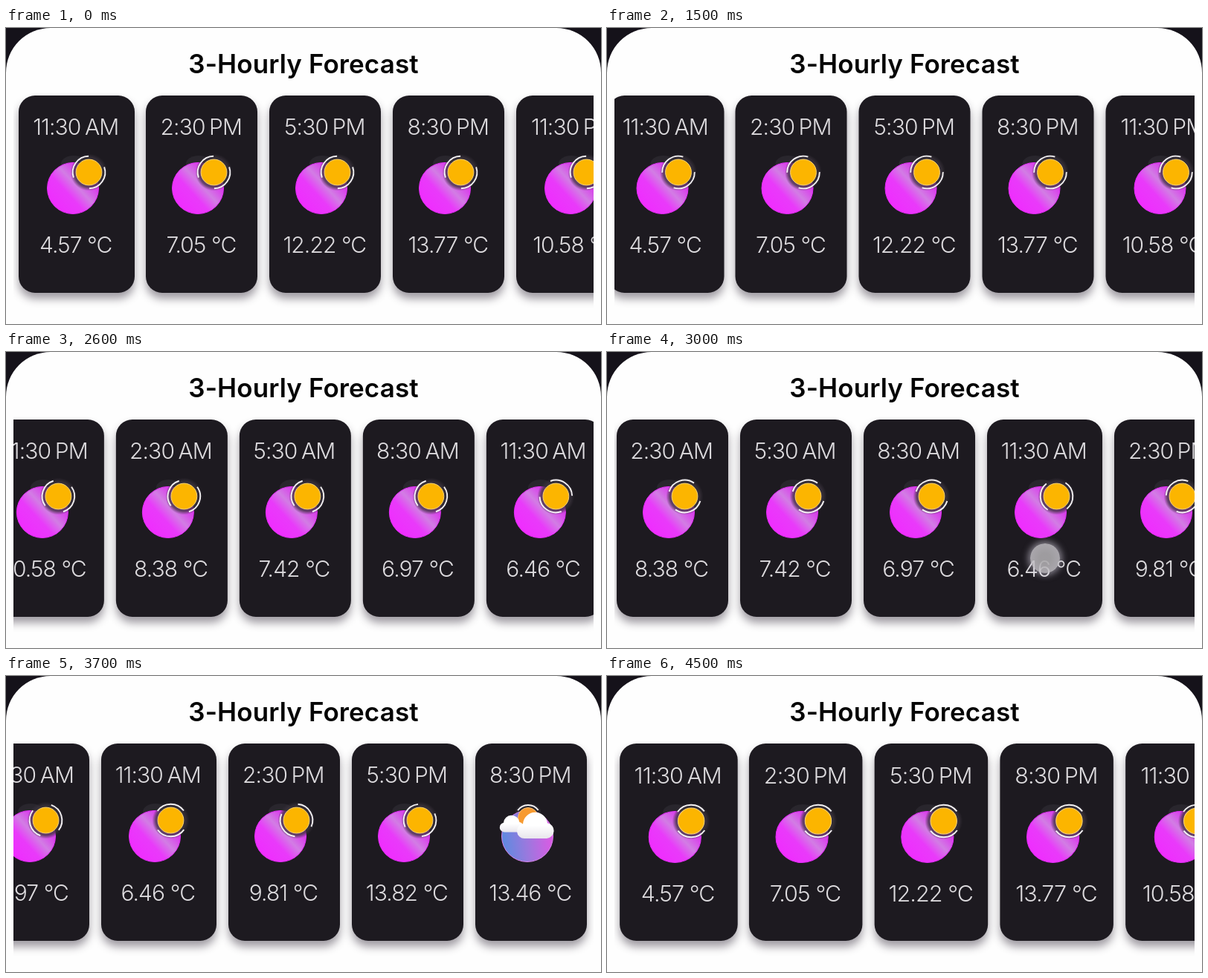
Recreate the animation shown at these times as an HTML page. Size 800 by 399 pixels, loop 4600 ms.

```html
<!DOCTYPE html>
<html lang="en">
<head>
<meta charset="utf-8">
<title>3-Hourly Forecast</title>
<style>
  html, body { margin: 0; width: 100%; height: 100%; overflow: hidden; background: #15121a; }
  body { font-family: Inter, "Liberation Sans", sans-serif; }
  #stage { position: relative; width: 800px; height: 399px; overflow: hidden; }
  #sheet { position: absolute; inset: 0; background: #fefefe; border-radius: 60px 60px 0 0; }
  h1 {
    position: absolute; top: 28px; left: 0; width: 800px; margin: 0;
    font-size: 35px; font-weight: 600; line-height: 40px; letter-spacing: .1px;
    text-align: center; color: #050505;
  }
  #view { position: absolute; left: 10px; top: 80px; width: 780px; height: 319px; overflow: hidden; }
  #strip {
    position: absolute; left: 7px; top: 10.5px; display: flex; gap: 15.8px;
    transform-origin: -7px 0;
  }
  .card {
    position: relative; flex: none; width: 150.2px; height: 266px; border-radius: 22px;
    background: #1d1a20; box-shadow: 0 8px 12px rgba(45, 35, 50, .45);
    color: #dddbde; text-align: center; white-space: nowrap;
    font-size: 30px; font-weight: 300; line-height: 40px; letter-spacing: -.9px;
  }
  .card.wide { width: 155.5px; }
  .time, .temp { position: absolute; left: -1px; width: 100%; }
  .time { top: 22.5px; word-spacing: -2px; }
  .temp { top: 181.5px; }
  .card svg {
    position: absolute; left: calc(50% - 1px); top: 125.5px;
    width: 1px; height: 1px; overflow: visible;
  }
  #touch {
    position: absolute; left: -20px; top: -20px; width: 40px; height: 40px; border-radius: 50%;
    background: radial-gradient(circle closest-side,
      rgba(172, 170, 173, .9) 35%, rgba(200, 197, 203, .82) 100%);
    box-shadow: 0 0 8px 3px rgba(232, 225, 242, .5);
  }
</style>
</head>
<body>
<svg width="0" height="0" style="position:absolute">
  <defs>
    <linearGradient id="pink" x1=".12" y1=".85" x2=".88" y2=".15">
      <stop offset="0" stop-color="#f02cff"/>
      <stop offset=".36" stop-color="#e93afa"/>
      <stop offset=".58" stop-color="#d27de4"/>
      <stop offset=".78" stop-color="#d848ea"/>
      <stop offset="1" stop-color="#c030d4"/>
    </linearGradient>
    <linearGradient id="dusk" x1="0" y1=".7" x2="1" y2=".6">
      <stop offset="0" stop-color="#5a8ce0"/>
      <stop offset=".5" stop-color="#9c78de"/>
      <stop offset="1" stop-color="#dc5ae4"/>
    </linearGradient>
    <linearGradient id="cloud" x1="0" y1="0" x2="0" y2="1">
      <stop offset=".5" stop-color="#fff"/>
      <stop offset="1" stop-color="#e8e6ec"/>
    </linearGradient>
    <radialGradient id="shade">
      <stop offset=".8" stop-color="#3a333d" stop-opacity=".75"/>
      <stop offset="1" stop-color="#3a333d" stop-opacity="0"/>
    </radialGradient>
  </defs>
</svg>
<div id="stage">
  <div id="sheet"></div>
  <h1>3-Hourly Forecast</h1>
  <div id="view"><div id="strip"></div></div>
  <div id="touch"></div>
</div>
<script>
const LOOP = 4600, STEP = 100, SPIN = 0.132;
const temps = [4.57, 7.05, 12.22, 13.77, 10.58, 8.38, 7.42, 6.97, 6.46, 9.81, 13.82, 13.46];

const smooth = p => p * p * (3 - 2 * p);
const easeOut = p => 1 - (1 - p) ** 2;
const easeIn = power => p => p ** power;

// The scroll position is the sum of these moves
const moves = [
  { start: 700, end: 1200, by: 15.5, ease: smooth },
  { start: 2008, end: 3000, by: 829.5, ease: easeOut },
  { start: 3000, end: 3400, by: 383, ease: smooth },
  { start: 3900, end: 4450, by: -1228, ease: easeIn(3.6) }
];
const swipes = [
  { start: 1900, end: 2200, from: [600, 272], to: [297, 327], ease: smooth },
  { start: 3000, end: 3400, from: [589, 278], to: [255, 331], ease: smooth },
  { start: 3900, end: 4200, from: [590, 257], to: [698, 239], ease: easeIn(2) }
];

const strip = document.getElementById('strip');
const touch = document.getElementById('touch');

function timeLabel(i) {
  const hour = (11 + 3 * i) % 24;
  return `${hour % 12 || 12}:30 ${hour < 12 ? 'AM' : 'PM'}`;
}

// Two opposite arcs around the origin
function ring(r) {
  const a = 54 * Math.PI / 180, x = r * Math.cos(a), y = r * Math.sin(a);
  const d = `M${x} ${-y}A${r} ${r} 0 0 1 ${x} ${y}M${-x} ${y}A${r} ${r} 0 0 1 ${-x} ${-y}`;
  return `<path class="ring" d="${d}" fill="none" stroke="#f4f2f4" stroke-width="1.9"/>`;
}

const cloud = (x, y, size) => `
  <path transform="translate(${x} ${y}) scale(${size})" fill="url(#cloud)"
    d="M-15 10a10 10 0 0 1 -2 -19.8a16.6 16.6 0 0 1 33 -1a10.5 10.5 0 0 1 -1 20.8z"/>`;

const disc = (fill, rim) => `
  <ellipse cx="-3" cy="-33" rx="17" ry="11" fill="#29262d"/>
  <circle cx="-4" r="34.5" fill="url(#${fill})" stroke="${rim}"/>`;

const clearIcon = `${disc('pink', '#e62cfa')}
  <g transform="translate(17.5 -21.5)">
    <circle r="25" fill="url(#shade)"/>
    ${ring(21.8)}
    <circle r="17.4" fill="#fcb500" stroke="#ffd775"/>
  </g>`;

const cloudyIcon = `${disc('dusk', '#d884ea')}
  <g transform="translate(-3 -25)">
    ${ring(17)}
    <circle r="13.5" fill="#f79a30" stroke="#ffc070"/>
  </g>
  ${cloud(-25, -12, .65)}${cloud(7, -7, 1)}`;

strip.innerHTML = temps.map((temp, i) => {
  const label = timeLabel(i);
  return `
  <div class="card${label.startsWith('11') ? ' wide' : ''}">
    <div class="time">${label}</div>
    <svg>${i === temps.length - 1 ? cloudyIcon : clearIcon}</svg>
    <div class="temp">${temp.toFixed(2)} °C</div>
  </div>`;
}).join('');
const rings = [...strip.querySelectorAll('.ring')];

function progress({ start, end, ease }, t) {
  return ease(Math.min(1, Math.max(0, (t - start) / (end - start))));
}

function draw(t) {
  const scroll = moves.reduce((sum, m) => sum + m.by * progress(m, t), 0);
  // Overscroll pulls the cards apart for a moment
  const stretch = t > 4400 ? 1 + 0.0165 * Math.sin(Math.PI * (t - 4400) / 200) : 1;
  strip.style.transform = `scaleX(${stretch}) translateX(${-scroll}px)`;

  // Cards created while scrolling spin out of step
  rings.forEach((el, i) => {
    const phase = i < 8 ? 0 : 60 * i - 14;
    el.setAttribute('transform', `rotate(${SPIN * t - 145 + phase})`);
  });

  const swipe = swipes.find(s => t >= s.start && t <= s.end);
  touch.style.visibility = swipe ? 'visible' : 'hidden';
  if (swipe) {
    const p = progress(swipe, t);
    const [x, y] = swipe.from.map((v, i) => v + (swipe.to[i] - v) * p);
    touch.style.transform = `translate(${x}px, ${y}px)`;
  }
}

// The picture advances ten times a second
const start = performance.now();
function tick() {
  const t = (performance.now() - start) % LOOP;
  draw(Math.floor(t / STEP) * STEP);
  requestAnimationFrame(tick);
}
tick();
</script>
</body>
</html>
```
